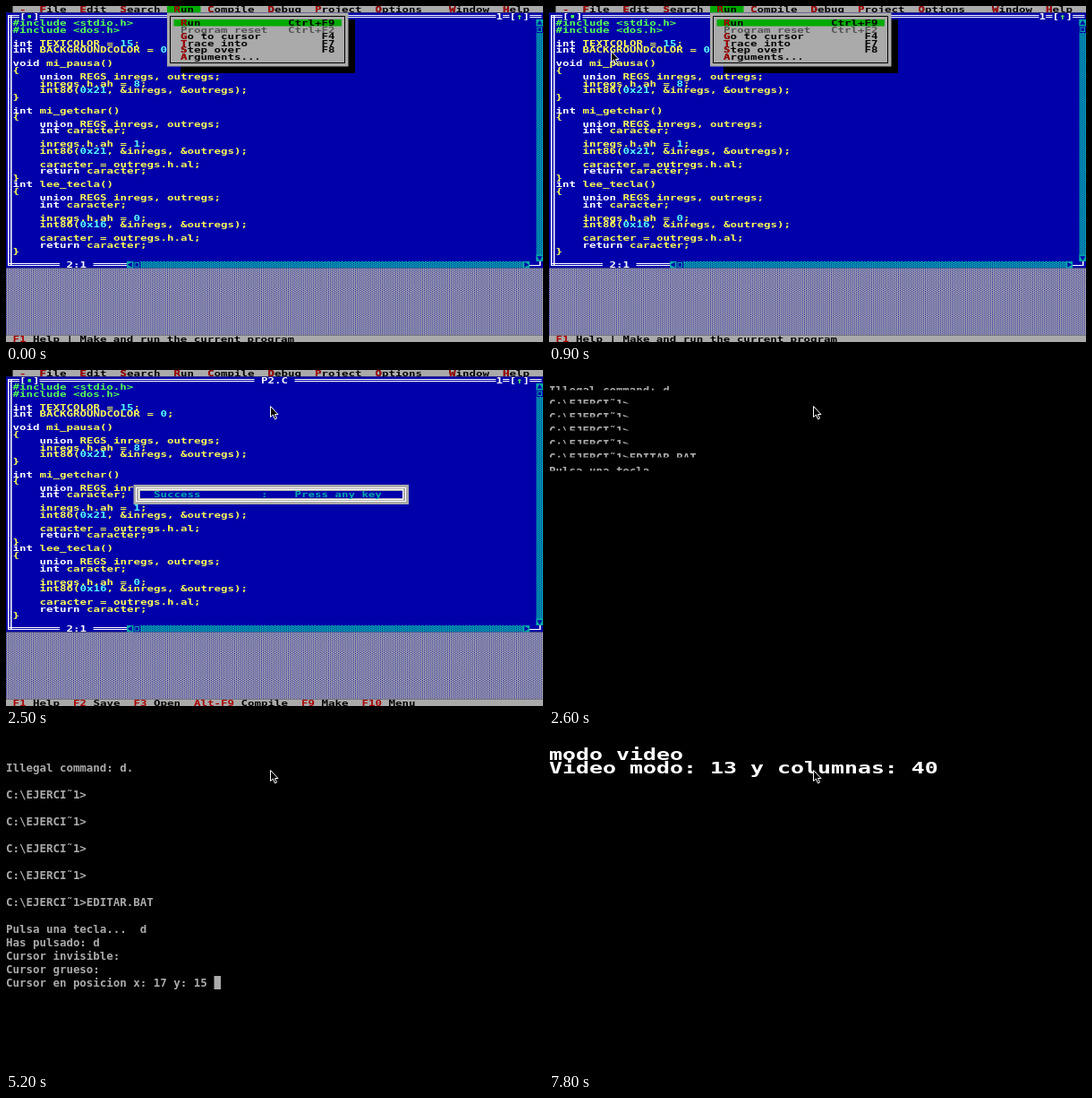
These frames come from a looping animation (600x375 px, 8 s). An HTML page with a canvas:

```html
<!DOCTYPE html>
<html lang="es">
<head>
<meta charset="utf-8">
<style>
  html, body { margin: 0; width: 100%; height: 100%; overflow: hidden; background: #000; }
  canvas { display: block; }
</style>
</head>
<body>
<canvas id="stage" width="600" height="375"></canvas>
<script>
const ctx = document.getElementById('stage').getContext('2d');
const LOOP = 8000;
const CELL = 7.5;
const ADVANCE = 0.60205; // glyph advance of the monospace font, in em
const FONT = '"DejaVu Sans Mono", monospace';

const BLACK = '#000', BLUE = '#0000aa', GREEN = '#00aa00', CYAN = '#00aaaa', RED = '#aa0000';
const GRAY = '#aaa', DARK = '#555', LIME = '#55ff55', AQUA = '#55ffff', YELLOW = '#ffff55', WHITE = '#fff';

const CODE = `#include <stdio.h>
#include <dos.h>

int TEXTCOLOR = 15;
int BACKGROUNDCOLOR = 0;

void mi_pausa()
{
    union REGS inregs, outregs;
    inregs.h.ah = 8;
    int86(0x21, &inregs, &outregs);
}

int mi_getchar()
{
    union REGS inregs, outregs;
    int caracter;

    inregs.h.ah = 1;
    int86(0x21, &inregs, &outregs);

    caracter = outregs.h.al;
    return caracter;
}
int lee_tecla()
{
    union REGS inregs, outregs;
    int caracter;

    inregs.h.ah = 0;
    int86(0x16, &inregs, &outregs);

    caracter = outregs.h.al;
    return caracter;
}`.split('\n');

const MENU_BAR = [['File', 5], ['Edit', 11], ['Search', 17], ['Run', 25], ['Compile', 30], ['Debug', 39],
  ['Project', 46], ['Options', 55], ['Window', 66], ['Help', 74]];

const RUN_MENU = [['Run', 'Ctrl+F9'], ['Program reset', 'Ctrl+F2'], ['Go to cursor', 'F4'],
  ['Trace into', 'F7'], ['Step over', 'F8'], ['Arguments...', '']];

const STATUS_KEYS = [['F1', 'Help', 1], ['F2', 'Save', 10], ['F3', 'Open', 19],
  ['Alt-F9', 'Compile', 28], ['F9', 'Make', 44], ['F10', 'Menu', 53]];

const PROMPT = 'C:\\EJERCI˜1>';
const HISTORY = ['', '', 'Illegal command: d.', '', PROMPT, '', PROMPT, '', PROMPT, '', PROMPT, '',
  PROMPT + 'EDITAR.BAT', '', 'Pulsa una tecla...'];

// Screen output: [time, row, text]
const OUTPUT = [
  [4200, 14, 'Pulsa una tecla...  d'],
  [4200, 15, 'Has pulsado: d'],
  [4200, 16, 'Cursor invisible:'],
  [4500, 17, 'Cursor grueso:'],
  [4900, 18, 'Cursor en posicion x: 17 y: 15'],
  [5600, 19, 'Cursor movido:']
];

// Text cursor: [from, to, column, row, height]
const CURSORS = [
  [2700, 4200, 20, 14, 2],
  [4500, 4900, 15, 17, 15],
  [4900, 5600, 31, 18, 15],
  [5900, 6200, 50, 13, 15]
];

// Mouse: [time, x, y]
const MOUSE = [[100, -12, 110], [900, 69, 50], [1000, 69, 50], [1600, 295, 40]];
const POINTER = new Path2D('M0 0V12L3 9.5L5 14.5L7 13.5L5 9H8.5Z');

function rect(color, x, y, w, h) {
  ctx.fillStyle = color;
  ctx.fillRect(x, y, w, h);
}

function cells(color, col, row, w, h = 1) {
  rect(color, col * CELL, row * CELL, w * CELL, h * CELL);
}

// Square, bold glyphs on a grid of the given cell size
function text(str, col, row, color, size = CELL) {
  ctx.save();
  ctx.translate(col * size, (row + 0.95) * size);
  ctx.scale(1, 0.72);
  ctx.font = `bold ${size / ADVANCE}px ${FONT}`;
  ctx.fillStyle = color;
  ctx.fillText(str, 0, 0);
  ctx.restore();
}

// Tall glyphs of the 80-column console
function tallText(str, y) {
  ctx.font = `bold ${CELL / ADVANCE}px ${FONT}`;
  ctx.fillStyle = GRAY;
  ctx.fillText(str, 0, y + 12.2);
}

function hotText(str, col, row) {
  text(str, col, row, BLACK);
  text(str[0], col, row, RED);
}

function shade(base) {
  const tile = document.createElement('canvas');
  tile.width = 4;
  tile.height = 2;
  const t = tile.getContext('2d');
  t.fillStyle = base;
  t.fillRect(0, 0, 4, 2);
  t.fillStyle = BLUE;
  t.fillRect(2, 0, 1, 1);
  t.fillRect(0, 1, 1, 1);
  const pattern = ctx.createPattern(tile, 'repeat');
  pattern.setTransform(new DOMMatrix().scale(CELL / 8));
  return pattern;
}
const DESKTOP = shade(GRAY), SCROLLBAR = shade(CYAN);

function doubleLine(fromCol, toCol, row) {
  const y = Math.round(row * CELL + 2);
  for (const dy of [0, 2]) rect(WHITE, fromCol * CELL, y + dy, (toCol - fromCol) * CELL, 1);
}

function arrow(col, row, dx, dy) {
  const x = (col + 0.5) * CELL, y = (row + 0.5) * CELL;
  ctx.fillStyle = BLUE;
  ctx.beginPath();
  ctx.moveTo(x + dx * 3, y + dy * 3);
  ctx.lineTo(x - dx * 2 + dy * 3, y - dy * 2 + dx * 3);
  ctx.lineTo(x - dx * 2 - dy * 3, y - dy * 2 - dx * 3);
  ctx.fill();
}

function thumb(col, row) {
  cells(BLUE, col, row, 1);
  ctx.strokeStyle = CYAN;
  ctx.strokeRect(col * CELL + 1.5, row * CELL + 1.5, 4.5, 4.5);
}

function drawCodeLine(line, row) {
  if (line[0] === '#') return text(line, 1, row, LIME);
  for (const { 0: token, index } of line.matchAll(/\w+|[^\w\s]+/g)) {
    const color = /^(int|void|union|return)$/.test(token) ? WHITE : /^\d/.test(token) ? AQUA : YELLOW;
    text(token, 1 + index, row, color);
  }
}

function drawEditor() {
  cells(BLUE, 0, 1, 80, 38);
  for (const x of [2, 5]) rect(WHITE, x, 10, 1.5, 280);
  doubleLine(0.3, 2, 1);
  doubleLine(5, 37, 1);
  doubleLine(43, 73, 1);
  doubleLine(74, 75, 1);
  doubleLine(78, 79.8, 1);
  text('[ ]', 2, 1, WHITE);
  rect(LIME, 24.5, 10, 3.5, 3.5);
  text('P2.C', 38, 1, WHITE);
  text('1', 73, 1, WHITE);
  text('[ ]', 75, 1, WHITE);
  text('↑', 76, 1, LIME);

  cells(SCROLLBAR, 79, 2, 1, 36);
  cells(CYAN, 79, 2, 1);
  cells(CYAN, 79, 37, 1);
  arrow(79, 2, 0, -1);
  arrow(79, 37, 0, 1);
  thumb(79, 3);

  doubleLine(0.3, 8, 38);
  text('2:1', 9, 38, WHITE);
  doubleLine(13, 18, 38);
  cells(SCROLLBAR, 18, 38, 60);
  cells(CYAN, 18, 38, 1);
  cells(CYAN, 77, 38, 1);
  arrow(18, 38, -1, 0);
  arrow(77, 38, 1, 0);
  thumb(19, 38);
  rect(WHITE, 585, 289, 12, 1);
  rect(WHITE, 596, 285, 1.5, 5);

  CODE.forEach((line, i) => drawCodeLine(line, i + 2));
}

function drawRunMenu() {
  cells(GREEN, 24, 0, 5);
  hotText('Run', 25, 0);
  cells(BLACK, 26, 2, 26, 8);
  cells(GRAY, 24, 1, 27, 8);
  ctx.strokeStyle = BLACK;
  ctx.strokeRect(183.5, 11.5, 195, 52);
  cells(GREEN, 25, 2, 25);
  RUN_MENU.forEach(([label, key], i) => {
    const row = i + 2;
    const disabled = label === 'Program reset';
    if (disabled) text(label, 26, row, DARK);
    else hotText(label, 26, row);
    text(key, 49 - key.length, row, disabled ? DARK : BLACK);
  });
}

function drawSuccess() {
  rect(GRAY, 142.5, 128, 307.5, 22);
  rect(BLUE, 150, 135, 293, 8);
  ctx.strokeStyle = WHITE;
  ctx.strokeRect(145.5, 131.5, 301, 15);
  ctx.strokeRect(148.5, 133.5, 295, 11);
  text('Success', 22, 18, CYAN);
  text(':', 38, 18, CYAN);
  text('Press any key', 43, 18, CYAN);
}

function drawIde(menuOpen) {
  cells(GRAY, 0, 0, 80);
  cells(BLACK, 0, 0, 1);
  text('-', 2, 0, RED);
  for (const [label, col] of MENU_BAR) hotText(label, col, 0);
  drawEditor();
  cells(DESKTOP, 0, 39, 80, 10);
  cells(GRAY, 0, 49, 80);
  if (menuOpen) {
    drawRunMenu();
    text('F1', 1, 49, RED);
    text('Help | Make and run the current program', 4, 49, BLACK);
  } else {
    drawSuccess();
    for (const [key, label, col] of STATUS_KEYS) {
      text(key, col, 49, RED);
      text(label, col + key.length + 1, 49, BLACK);
    }
  }
}

// Console squeezed into 50 rows: only the upper half of each glyph shows
function drawSqueezed() {
  HISTORY.forEach((line, row) => {
    ctx.save();
    ctx.beginPath();
    ctx.rect(0, row * CELL, 600, CELL);
    ctx.clip();
    tallText(line, row * CELL);
    ctx.restore();
  });
}

function drawConsole(t) {
  const lines = [...HISTORY];
  for (const [time, row, line] of OUTPUT) if (t >= time) lines[row] = line;
  lines.forEach((line, row) => tallText(line, row * 15));
  for (const [from, to, col, row, height] of CURSORS) {
    if (t >= from && t < to) rect(GRAY, col * CELL, row * 15 + 15 - height, CELL, height);
  }
}

function drawVideoMode(t) {
  text('modo video', 0, 1, WHITE, 15);
  if (t >= 7800) text('Video modo: 13 y columnas: 40', 0, 2, WHITE, 15);
}

function mouseAt(t) {
  const next = MOUSE.findIndex(key => key[0] > t);
  if (next < 0) return MOUSE[MOUSE.length - 1].slice(1);
  if (next === 0) return MOUSE[0].slice(1);
  const [t0, x0, y0] = MOUSE[next - 1], [t1, x1, y1] = MOUSE[next];
  const p = (t - t0) / (t1 - t0), ease = p * p * (3 - 2 * p);
  return [x0 + (x1 - x0) * ease, y0 + (y1 - y0) * ease];
}

function drawMouse(t) {
  const [x, y] = mouseAt(t);
  ctx.save();
  ctx.translate(x + 0.5, y + 0.5);
  ctx.fillStyle = BLACK;
  ctx.strokeStyle = WHITE;
  ctx.fill(POINTER);
  ctx.stroke(POINTER);
  ctx.restore();
}

function draw(t) {
  ctx.lineWidth = 1;
  rect(BLACK, 0, 0, 600, 375);
  if (t < 2600) drawIde(t < 2400);
  else if (t < 2700) drawSqueezed();
  else if (t < 6600) drawConsole(t);
  else drawVideoMode(t);
  drawMouse(t);
}

const start = performance.now();
function tick() {
  draw((performance.now() - start) % LOOP);
  requestAnimationFrame(tick);
}
tick();
</script>
</body>
</html>
```
